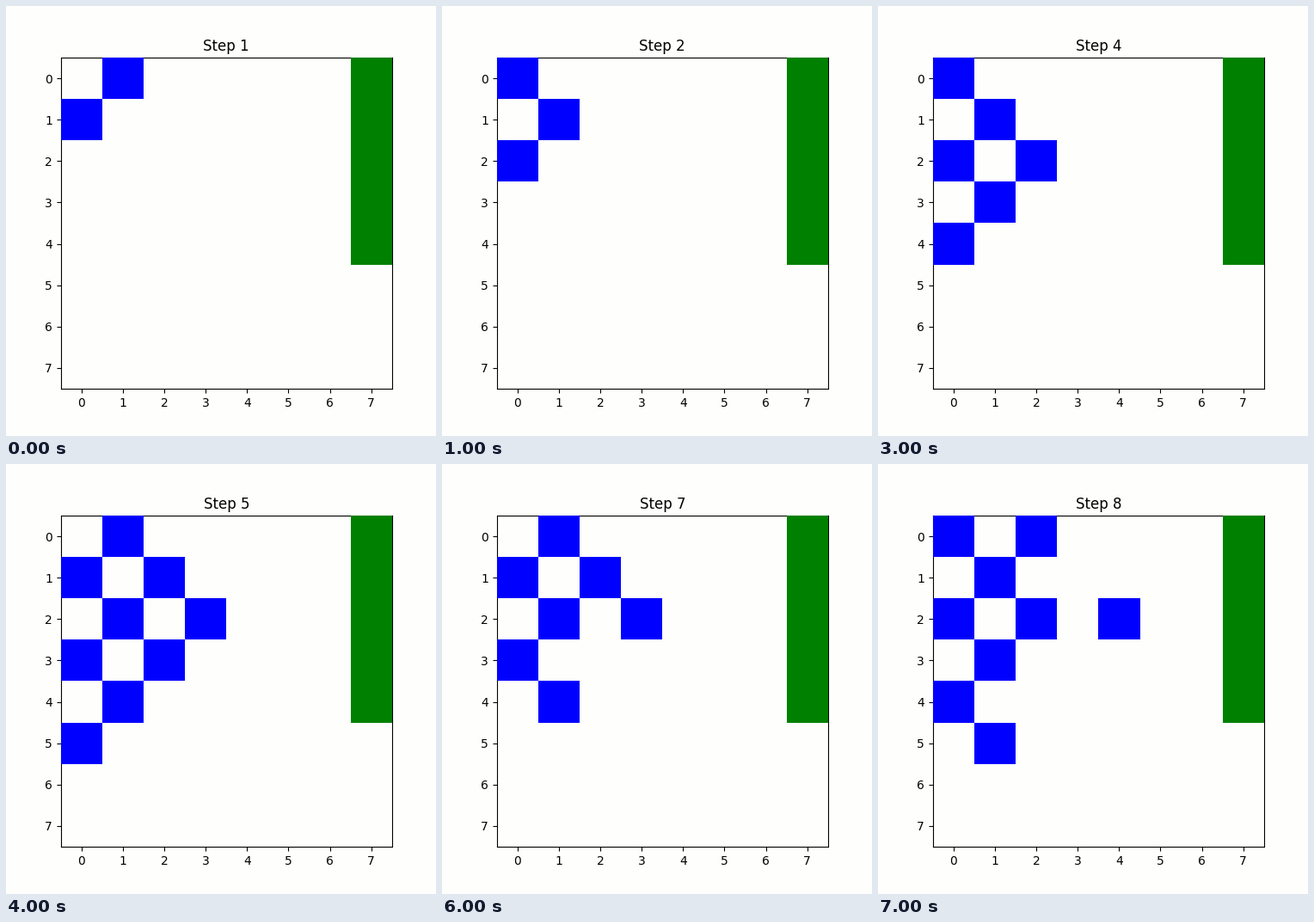
Recreate the animation shown at these times as a matplotlib script. Size 500 by 500 pixels, loop 8000 ms.

```python
import numpy as np
import matplotlib.pyplot as plt
from matplotlib.animation import FuncAnimation
from matplotlib.colors import ListedColormap

SIZE = 8
PAPER = "#fefefc"
EMPTY, WALKER, GOAL = range(3)

# Occupied cells at each step, written as row-column digit pairs.
STEPS = [
    "01 10",
    "00 11 20",
    "01 10 12 21 30",
    "00 11 20 22 31 40",
    "01 10 12 21 23 30 32 41 50",
    "00 02 11 20 22 31 40 42",
    "01 10 12 21 23 30 41",
    "00 02 11 20 22 24 31 40 51",
]


def make_grid(step):
    grid = np.full((SIZE, SIZE), EMPTY)
    grid[:5, -1] = GOAL
    for row, col in STEPS[step].split():
        grid[int(row), int(col)] = WALKER
    return grid


fig, ax = plt.subplots(figsize=(5, 5), dpi=100, facecolor=PAPER)
ax.set_facecolor(PAPER)

# Filled cells lie over the axes border; empty ones let it show.
cmap = ListedColormap([(1, 1, 1, 0), "blue", "green"])
image = ax.imshow(make_grid(0), cmap=cmap, vmin=EMPTY, vmax=GOAL,
                  interpolation="nearest", zorder=3)
ax.set_xticks(range(SIZE))
ax.set_yticks(range(SIZE))
title = ax.set_title("Step 1")


def update(step):
    image.set_data(make_grid(step))
    title.set_text(f"Step {step + 1}")
    return image, title


anim = FuncAnimation(fig, update, frames=len(STEPS), interval=1000,
                     repeat=True, repeat_delay=0)
plt.show()
```
